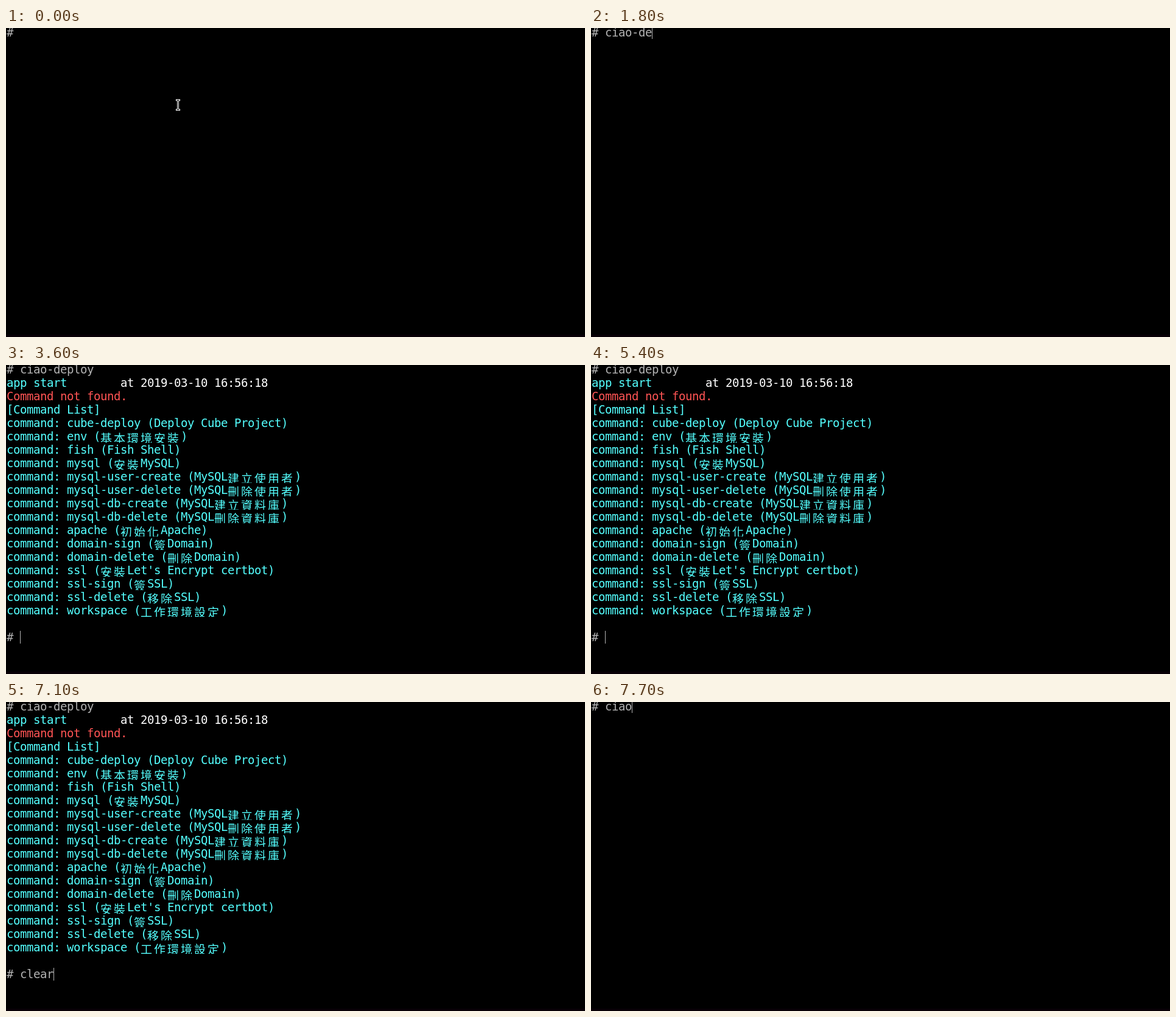
Recreate the animation shown at these times as an HTML page with a canvas. Size 951 px wide and 508 px high, loop 8 s.

```html
<!DOCTYPE html>
<html lang="zh-Hant">
<head>
<meta charset="utf-8">
<title>Terminal</title>
<style>
html, body { margin: 0; width: 100%; height: 100%; overflow: hidden; background: #000; }
canvas { display: block; }
</style>
</head>
<body>
<canvas width="951" height="508"></canvas>
<script>
const ctx = document.querySelector('canvas').getContext('2d');
const LOOP = 8000, CELL = 11, ROW = 22;
const GRAY = '#b2b2b2', CYAN = '#54ffff', RED = '#ff5454', WHITE = '#fff';
const LATIN = '19px "DejaVu Sans Mono", monospace';
const CJK = '19px "Noto Sans CJK TC", "Noto Sans CJK", sans-serif';

const commands = [
  'cube-deploy (Deploy Cube Project)',
  'env (基本環境安裝)',
  'fish (Fish Shell)',
  'mysql (安裝MySQL)',
  'mysql-user-create (MySQL建立使用者)',
  'mysql-user-delete (MySQL刪除使用者)',
  'mysql-db-create (MySQL建立資料庫)',
  'mysql-db-delete (MySQL刪除資料庫)',
  'apache (初始化Apache)',
  'domain-sign (簽Domain)',
  'domain-delete (刪除Domain)',
  "ssl (安裝Let's Encrypt certbot)",
  'ssl-sign (簽SSL)',
  'ssl-delete (移除SSL)',
  'workspace (工作環境設定)'
];

// Key press times for each typed command
const deployKeys = [1000, 1100, 1200, 1300, 1600, 1700, 1800, 1900, 2100, 2300, 2600];
const clearKeys = [6700, 6800, 6900, 7100, 7100];
const againKeys = [7400, 7500, 7600, 7700];

const typed = (text, keys, t) => '# ' + text.slice(0, keys.filter(k => k <= t).length);
const rowTop = row => row * ROW - 4;

function rect(color, x, y, w, h) {
  ctx.fillStyle = color;
  ctx.fillRect(x, y, w, h);
}

// Draws text on the character grid; wide glyphs take two cells and sit lower, cut off by the row
function write(text, row, color, col = 0) {
  const top = rowTop(row);
  ctx.save();
  ctx.beginPath();
  ctx.rect(0, top, 951, ROW);
  ctx.clip();
  ctx.fillStyle = color;
  for (const ch of text) {
    const wide = ch > '\u2e80';
    ctx.font = wide ? CJK : LATIN;
    ctx.fillText(ch, 1 + col * CELL, top + (wide ? 22 : 18));
    col += wide ? 2 : 1;
  }
  ctx.restore();
}

function cursor(col, row) {
  rect(GRAY, 1 + col * CELL, rowTop(row) + 1, 1, ROW - 1);
}

function pointer() {
  rect(WHITE, 279, 117, 7, 3);
  rect(WHITE, 279, 133, 7, 3);
  rect(WHITE, 281, 117, 3, 19);
  rect('#000', 280, 118, 5, 1);
  rect('#000', 280, 134, 5, 1);
  rect('#000', 282, 118, 1, 17);
}

function listing() {
  write('app start', 1, CYAN);
  write('at 2019-03-10 16:56:18', 1, WHITE, 17);
  write('Command not found.', 2, RED);
  write('[Command List]', 3, CYAN);
  commands.forEach((c, i) => write('command: ' + c, 4 + i, CYAN));
}

function cursorOn(t) {
  if (t < 500 || (t >= 3100 && t < 3300)) return false;
  if (t < 3800 || t >= 6400) return true;
  return t >= 4400 && Math.floor((t - 4400) / 500) % 2 === 0;
}

function draw(t) {
  rect('#000', 0, 0, 951, 508);
  rect('#080006', 0, 504, 951, 4);
  const cleared = t >= 7200;
  const first = cleared ? typed('ciao', againKeys, t) : typed('ciao-deploy', deployKeys, t);
  write(first, 0, GRAY);
  if (t < 1000) pointer();

  let col = first.length, row = 0;
  if (t >= 3300 && t < 3600) {
    col = 0;
    row = 1;
  } else if (t >= 3600 && !cleared) {
    listing();
    const prompt = typed('clear', clearKeys, t);
    row = 20;
    write(prompt, row, GRAY);
    col = prompt.length;
  }
  if (cursorOn(t)) cursor(col, row);
}

const start = performance.now();
function frame() {
  draw((performance.now() - start) % LOOP);
  requestAnimationFrame(frame);
}
frame();
</script>
</body>
</html>
```
